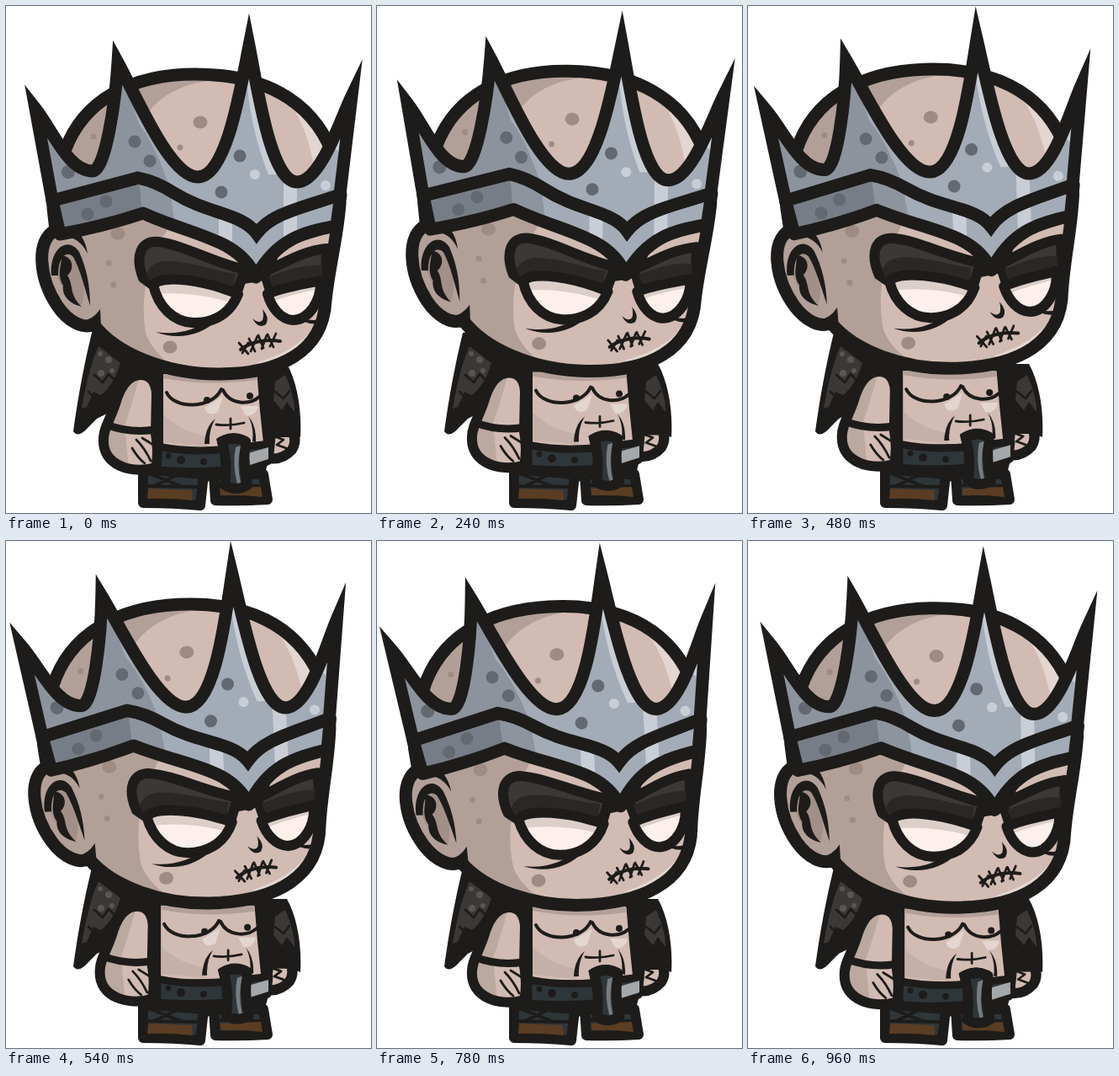
These frames come from a looping animation (434 px wide and 602 px high, 1.02 s). An HTML page:

```html
<!DOCTYPE html>
<html lang="en">
<head>
<meta charset="utf-8">
<title>Crowned brute</title>
<style>
html, body { margin: 0; width: 100%; height: 100%; overflow: hidden; background: #fff; }
svg { display: block; width: 100vw; height: 100vh; }
.o { stroke: #1d1c1a; stroke-width: 12px; stroke-linejoin: round; stroke-linecap: round; }
.wide { stroke-width: 15px; }
.thin { stroke-width: 9px; }
.spike { stroke-linejoin: miter; stroke-miterlimit: 20; }
.l { fill: none; stroke: #1d1c1a; stroke-width: 4px; stroke-linecap: round; stroke-linejoin: round; }
.fine { stroke-width: 2.8px; }
.n { fill: none; }
.k { fill: #1d1c1a; }
.skin { fill: #d2bbb3; }
.shade { fill: #b2a098; }
.glow { fill: #e3d6d1; }
.spot { fill: #9d8b84; }
.dark { fill: #3b3836; }
.deep { fill: #2a2827; }
.cloth { fill: #2f363a; }
.dot { fill: #646870; }
.shine { fill: #c9ced6; }
</style>
</head>
<body>
<svg viewBox="0 0 434 602">
<defs>
  <path id="skull" d="M70 172C92 111 150 81 225 81C305 81 362 111 387 172L397 235C394 275 384 310 380 350C377 411 325 437 252 437C188 437 130 412 104 378C92 384 74 375 61 356C39 323 35 278 59 266L56 240Z"/>
  <path id="crown" d="M35 122C57 150 74 196 103 196C118 196 130 115 133 67C155 107 195 203 228 203C262 203 278.5 100 289 47C299.5 100 315 209 346 209C374 209 397 136 411 107L397 224C350 240 316 246 298 270C281 246 240 247 200 222Q178 208 157 204L55 231Z"/>
  <path id="band" d="M55 231L157 204Q178 208 200 222C240 247 281 246 298 270C316 246 350 240 398 224L393 261C352 269 322 277 297 322C277 276 225 274 163 246Q115 262 64 271Z"/>
  <path id="arm" d="M160 438C172 438 178 446 179 460L178 508Q182 530 178 548C150 556 114 546 116 514C116 500 126 488 132 466Q142 438 160 438Z"/>
  <path id="eyes" d="M175 331C186 318 237 326 276 342C265 370 240 377 222 376C199 375 181 357 175 331ZM311 342C328 334 351 331 374 326C375 350 360 373 341 373C327 372 316 359 311 342Z"/>
  <clipPath id="inSkull"><use href="#skull"/></clipPath>
  <clipPath id="inCrown"><use href="#crown"/></clipPath>
  <clipPath id="inBand"><use href="#band"/></clipPath>
  <clipPath id="inArm"><use href="#arm"/></clipPath>
  <clipPath id="inEyes"><use href="#eyes"/></clipPath>
</defs>

<!-- legs -->
<path class="k" d="M165 540H312L306 562H248L236 566H165Z"/>
<path class="o cloth" d="M163 550L163 590Q200 590 231 593L235 556ZM247 556L249 587Q280 588 311 586L306 556Z"/>
<path class="l" d="M172 556L208 570M205 556L176 570M166 570L229 571M250 569L306 570"/>
<path d="M169 573L221 575L222 587Q195 584 168 585Z M255 573L303 571L305 583Q280 580 255 581Z" fill="#5b3d23"/>

<!-- wings -->
<path class="k" d="M102 388C93 425 86 462 80 505Q86 514 98 500L108 490L128 480L190 470V420L130 385ZM300 425L334 425C346 446 352 480 350 512L334 505L300 496Z"/>
<path class="dark" d="M110 404L136 424Q128 450 113 462L104 458L96 476L90 478Q98 430 110 404ZM320 446L332 438Q344 466 343 482L334 470L328 480L318 468Z"/>
<path class="l fine" d="M105 438L115 447L122 437L130 445M98 458L106 466M320 458L330 466L337 457"/>
<g fill="#595653"><circle cx="122" cy="420" r="4"/><circle cx="112" cy="413" r="3"/><circle cx="113" cy="436" r="4"/><circle cx="126" cy="433" r="3"/></g>

<g id="body">
  <path class="o skin" d="M181 432H304L308 480L313 528L181 532Z"/>
  <path class="shade" d="M187 437H298L299 444Q240 452 187 442Z"/>
  <path class="shade" d="M187 485Q210 506 236 510L240 523L187 518Z" opacity=".4"/>
  <path class="glow" d="M236 477L258 463L252 482Q240 489 236 477ZM279 475L300 475Q297 488 285 486Z"/>
  <path class="l" d="M191 459C200 479 245 479 256 455M258 456C266 474 290 474 301 464"/>
  <path class="k" d="M236 520Q237 499 249 490Q241 503 242 520ZM288 487Q298 498 297 518L293 517Q295 500 288 487Z"/>
  <circle class="k" cx="239" cy="468" r="4"/><circle class="k" cx="290" cy="463" r="4"/>
  <path class="l fine" d="M250 497Q266 499 283 495M267 490V502"/>
  <path class="o skin" d="M315 507L334 497Q349 512 340 527Q328 540 312 537Z"/>
  <path class="l fine" d="M319 511L330 515L322 521L333 525"/>
  <path class="k" d="M309 492L336 497L348 512L314 512Z"/>
</g>
<g id="belt">
  <path class="o thin cloth" d="M180 523Q222 531 264 526L313 520L311 541Q260 557 180 551Z"/>
  <path d="M288 531L312 524L312 538L290 545Z" fill="#a4a8ab"/>
  <g class="k"><circle cx="193" cy="534" r="3.5"/><circle cx="208" cy="539" r="5"/><circle cx="235" cy="541" r="4"/></g>
</g>
<g id="axe">
  <path class="o cloth" d="M257 517Q271 510 285 517Q281 542 287 569Q273 577 260 569Q264 542 257 517Z"/>
  <path d="M273 524L279 522Q274 545 279 566L275 567Q269 545 273 524Z" fill="#777d80"/>
  <path class="k" d="M250 514Q269 501 288 512L289 522Q269 515 253 526Z"/>
</g>
<g id="limb">
  <use href="#arm" class="skin"/>
  <path class="shade" clip-path="url(#inArm)" d="M160 435Q151 470 141 498L146 550H105V435Z" opacity=".7"/>
  <use href="#arm" class="o n"/>
  <path class="o n thin" d="M119 497Q148 508 177 503"/>
  <path class="l fine" d="M155 515Q165 525 172 540M150 525Q157 537 165 543M162 513L175 521"/>
</g>

<g id="head">
  <use href="#skull" class="skin"/>
  <g clip-path="url(#inSkull)">
    <path class="shade" d="M30 70H240V89C200 94 166 116 155 155L210 240C172 286 158 340 166 388Q174 412 204 432L200 450H30Z"/>
    <path class="glow" d="M304 85C336 102 358 140 366 190L400 190L380 80ZM378 362Q360 406 296 424Q338 436 390 430Z"/>
  </g>
  <g class="spot">
    <ellipse cx="231" cy="138" rx="8.5" ry="7.5"/><circle cx="104" cy="155" r="3.5"/><circle cx="207" cy="168" r="3.5"/>
    <ellipse cx="133" cy="270" rx="8.5" ry="7.5"/><circle cx="122" cy="305" r="3.5"/><circle cx="128" cy="331" r="3.5"/>
    <ellipse cx="195" cy="405" rx="8.5" ry="7.5"/>
  </g>
  <use href="#skull" class="o n wide"/>

  <!-- ear -->
  <path d="M60 314C57 287 75 281 84 294C94 315 95 340 90 355C78 350 62 335 60 314Z" fill="#a28f88"/>
  <path class="k" d="M54 320C51 288 74 272 87 292C96 312 100 332 100 356C94 336 88 312 80 298C72 290 62 297 62 320ZM66 296C80 298 82 312 73 320C81 331 74 342 90 357C77 354 66 345 68 332C60 318 66 310 66 296ZM58 258C78 257 94 270 97 294C90 279 78 271 58 274ZM90 374Q103 373 112 360L113 382L100 385Z"/>

  <!-- crown -->
  <use href="#band" fill="#a3abb6"/>
  <g clip-path="url(#inBand)">
    <path d="M50 190H158L164 275H50Z" fill="#777d86"/>
    <path d="M157 190H191L203 275H164Z" fill="#8d949e"/>
    <path class="shine" d="M253 230H269V290H253ZM330 225H346V285H330Z"/>
    <circle class="dot" cx="97" cy="247" r="7.5"/><circle class="dot" cx="119" cy="232" r="7.5"/>
  </g>
  <use href="#band" class="o n wide"/>
  <use href="#crown" fill="#a3abb6"/>
  <g clip-path="url(#inCrown)">
    <path d="M20 60H133L158 140Q182 170 202 240H20Z" fill="#8d939d"/>
    <path class="shine" d="M285 70Q288 140 312 200H332L300 60ZM330 200H346V260H330ZM388 100H420V173Q399 182 388 165Z"/>
    <circle class="shine" cx="296" cy="200" r="6"/><circle class="shine" cx="380" cy="213" r="6"/>
    <g class="dot">
      <circle cx="74" cy="197" r="8"/><circle cx="153" cy="161" r="7.5"/><circle cx="171" cy="184" r="7.5"/>
      <circle cx="278" cy="178" r="7.5"/><circle cx="256" cy="221" r="7.5"/>
    </g>
  </g>
  <use href="#crown" class="o n wide spike"/>

  <!-- eyes -->
  <path class="k" d="M262 302L297 318L324 296L316 322L302 327L282 330Z"/>
  <path class="o dark" d="M163 323C153 297 160 278 181 280C212 284 242 303 284 313L276 336L178 334ZM307 315C325 309 350 291 381 288L380 328L314 338Z"/>
  <path class="deep" d="M167 318Q172 303 193 303C222 304 245 314 273 318L270 333L174 332ZM312 322Q350 306 376 308V328L318 336Z"/>
  <use href="#eyes" fill="#fdefeb"/>
  <path clip-path="url(#inEyes)" d="M170 310H380V335Q350 339 312 352L278 356Q230 338 176 342Z" fill="#dccfca"/>
  <use href="#eyes" class="o n"/>
  <path class="k" d="M178 387C204 391 226 385 243 371L251 373C232 392 203 397 178 387ZM345 368Q358 375 374 372V377Q357 380 345 368Z"/>

  <!-- nose and mouth -->
  <path class="k" d="M305 360Q314 370 309 378Q300 384 293 371Q301 378 305 373Q307 368 305 360Z"/>
  <path class="l" d="M279 408C290 399 308 395 326 398"/>
  <path class="l fine" d="M277 400L288 413M288 400L281 412M289 395L296 410M299 392L291 410M300 391L306 406M310 391L304 407M311 390L318 405M321 389L314 404"/>
</g>
</svg>
<script>
// time, head angle, head pivot x and y, body shift x and y
const keys = [
  [0, 0, 302, 402, 0, 0],
  [240, .72, 299.7, 399.2, -2.5, -2.5],
  [360, -.71, 299, 396.8, -3, -3],
  [480, -2, 297.4, 393.4, -3.5, -4],
  [660, -3.3, 297.9, 392.3, -3.5, -4],
  [780, -3.05, 298.7, 394.5, -2.5, -3],
  [960, -1, 299.6, 399.3, -1, -.5]
];
const loop = 1020, step = 60, count = keys.length;

function key(i) {
  const k = [...keys[(i + count) % count]];
  k[0] += Math.floor(i / count) * loop;
  return k;
}

// Smooth cyclic curve through the keys
function pose(t) {
  const i = keys.findLastIndex(k => k[0] <= t);
  const [a, b, c, d] = [-1, 0, 1, 2].map(n => key(i + n));
  const span = c[0] - b[0], u = (t - b[0]) / span, v = 1 - u;
  return b.map((_, n) => {
    const m = (c[n] - a[n]) / (c[0] - a[0]) * span;
    const w = (d[n] - b[n]) / (d[0] - b[0]) * span;
    return v * v * (1 + 2 * u) * b[n] + u * v * v * m + u * u * (3 - 2 * u) * c[n] - u * u * v * w;
  });
}

const move = (id, value) => document.getElementById(id).setAttribute("transform", value);

function draw(now) {
  const t = Math.floor(now % loop / step) * step;
  const [, angle, x, y, dx, dy] = pose(t);
  move("head", `translate(${x} ${y}) rotate(${angle}) translate(-302 -402)`);
  move("body", `translate(${dx * .8} ${dy})`);
  move("limb", `translate(${dx * 1.2} ${dy})`);
  move("belt", `translate(0 ${dy * .7})`);
  move("axe", `translate(${-dx * .5} ${dy * 1.3})`);
}

const start = performance.now();
function tick() {
  draw(performance.now() - start);
  requestAnimationFrame(tick);
}
tick();
</script>
</body>
</html>
```
